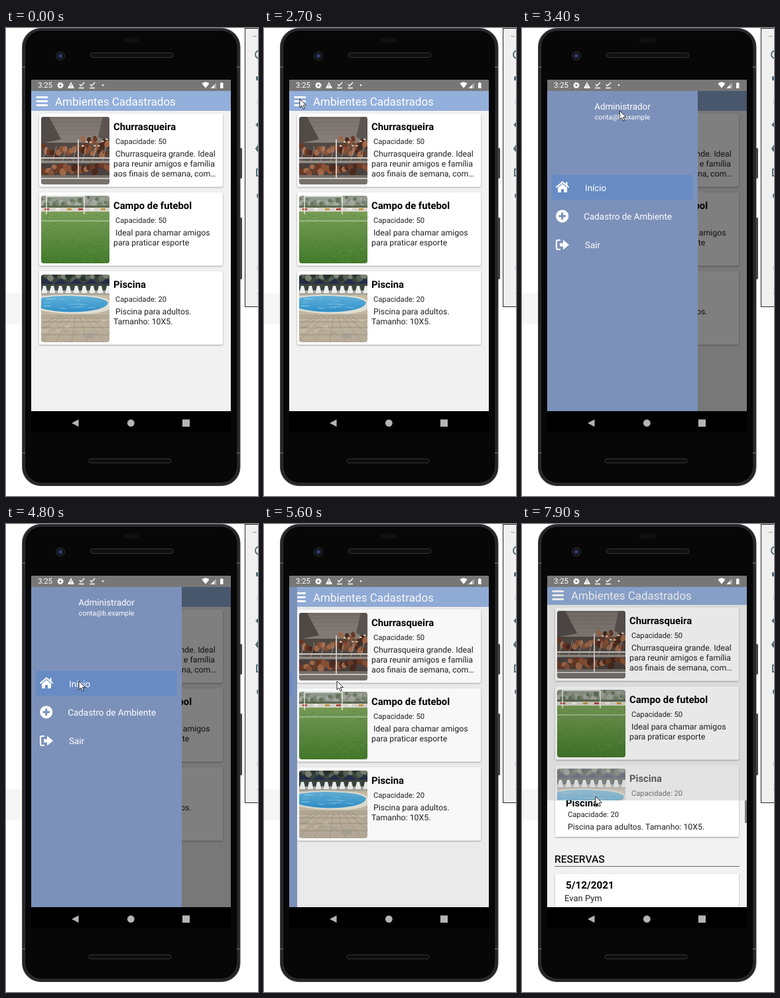
Write an HTML page that moves like this. It is 380x706 px and loops after 8 s.

```html
<!DOCTYPE html>
<html lang="pt-BR">
<head>
<meta charset="utf-8">
<title>Ambientes Cadastrados</title>
<style>
html, body { margin: 0; width: 100%; height: 100%; overflow: hidden; background: #fff; }
svg { display: block; font-family: Roboto, sans-serif; text-rendering: geometricPrecision; }
text { white-space: pre; }
</style>
</head>
<body>
<svg id="stage" width="380" height="706" viewBox="0 0 380 706"></svg>
<script>
const LOOP = 8000, STEP = 100, DRAWER = 227;

let seed = 7;
const rnd = (a = 0, b = 1) => {
  seed = (seed * 16807) % 2147483647;
  return a + (b - a) * seed / 2147483647;
};
const many = (n, fn) => Array.from({ length: n }, (_, i) => fn(i)).join('');
const rect = (x, y, w, h, fill, more = '') =>
  `<rect x="${x}" y="${y}" width="${w}" height="${h}" fill="${fill}" ${more}/>`;
const path = (d, fill, more = '') => `<path d="${d}" fill="${fill}" ${more}/>`;
const line = (d, stroke, width, more = '') =>
  path(d, 'none', `stroke="${stroke}" stroke-width="${width}" ${more}`);
const disc = (x, y, r, fill, more = '') => `<circle cx="${x}" cy="${y}" r="${r}" fill="${fill}" ${more}/>`;
const text = (x, y, size, str, fill = '#222', more = '') =>
  `<text x="${x}" y="${y}" font-size="${size}" fill="${fill}" ${more}>${str}</text>`;
const bold = 'font-weight="700"';

const defs = `<defs>
  <clipPath id="screen">${rect(38, 95, 301, 483, '#000')}</clipPath>
  <clipPath id="reveal"><rect id="edge" x="38" y="578" width="301" height="0"/></clipPath>
  <clipPath id="pic">${rect(0, 0, 103, 102, '#000', 'rx="4"')}</clipPath>
  <filter id="lift" x="-5%" y="-10%" width="110%" height="125%">
    <feDropShadow dx="0" dy="1" stdDeviation="1.2" flood-opacity=".38"/>
  </filter>
  <linearGradient id="wall" x2="0" y2="1"><stop stop-color="#756d68"/><stop offset="1" stop-color="#a39b94"/></linearGradient>
  <linearGradient id="grass" x2="0" y2="1"><stop stop-color="#779d57"/><stop offset="1" stop-color="#437a2b"/></linearGradient>
  <linearGradient id="water" x2="0" y2="1"><stop stop-color="#62b2d9"/><stop offset="1" stop-color="#2f8fca"/></linearGradient>
  <linearGradient id="deck" x2="0" y2="1"><stop stop-color="#c9bda5"/><stop offset="1" stop-color="#b6ab98"/></linearGradient>
</defs>`;

function phone() {
  const edge = '#546e7a';
  return rect(0, 400, 26, 47, '#f7f6f6') +
    rect(360.5, .5, 30, 420, '#f0f0f0', 'stroke="#222"') +
    line('M372 12.5H378', '#999', 1) +
    line('M382 34A6 6 0 0 0 382 46', edge, 2) +
    path('M377 73H380V79H377Z', edge) +
    path('M376 146L380 142V150Z', edge) +
    line('M381 176L377 182L382 188', edge, 2) + disc(380, 183, 3, edge) +
    line('M382 213H378V223H382', edge, 2) +
    disc(382, 253, 4, edge) +
    line('M379 108V114M379 359V366M379 399V402', '#c4cbce', 1) +
    rect(351, 181, 5, 46, '#3d3f41', 'rx="1.5"') + rect(351, 286, 5, 93, '#3d3f41', 'rx="1.5"') +
    rect(24.5, .5, 328.5, 690, '#242527', 'rx="28" stroke="#47494b"') +
    rect(28.5, 3.5, 320.5, 683, '#070708', 'rx="25" stroke="#38393b" stroke-width=".8"') +
    line('M24 59H29M348 59H353M24 641H29M348 641H353', '#55575a', 2) +
    rect(177, 15, 24, 7, '#101011', 'rx="3"') +
    rect(127, 37.5, 125, 7, '#111', 'rx="3.5" stroke="#343434"') +
    rect(125, 650, 124, 6, '#0c0c0c', 'rx="3" stroke="#363636"') +
    disc(82, 42, 6.5, '#121318', 'stroke="#303136"') + disc(82, 42, 3, '#2b3c70') +
    rect(38, 78, 301, 532, '#000') +
    path('M99 596L109.5 590.5V601.5Z', '#b5b5b5') + disc(188.3, 596, 5.4, '#b5b5b5') +
    rect(266, 590.5, 11, 11, '#b5b5b5');
}

function statusBar() {
  const tick = x => line(`M${x - 3} 85L${x - 1} 87.5L${x + 4} 82M${x - 4} 90.5H${x + 4}`, '#fff', 1.4);
  return rect(38, 78, 301, 17, '#777') + text(48, 90.4, 11.4, '3:25', '#fff') +
    disc(82, 86.5, 2.7, 'none', 'stroke="#fff" stroke-width="2.2"') +
    disc(82, 86.5, 4.1, 'none', 'stroke="#fff" stroke-width="1.4" stroke-dasharray="1.7 1.52"') +
    path('M98 81.5L103 91H93Z', '#fff') + line('M98 84.8V87.6M98 88.6V89.7', '#777', 1.1) +
    tick(114) + tick(130) + disc(146, 86.3, 1.2, '#fff') +
    path('M295.5 83.7Q301 79.3 306.5 83.7L301 90.7Z', '#fff') +
    path('M308.5 91L317 82.5V91Z', '#aaa') + path('M308.5 91L314 85.5V91Z', '#fff') +
    path('M323 83H324.2V82H326.3V83H327.5V91H323Z', '#fff');
}

function grill() {
  const meat = (x, y) => `<ellipse cx="${x}" cy="${y}" rx="${rnd(3, 5)}" ry="${rnd(3.5, 6)}" fill="${
    ['#6b3a25', '#8a5136', '#4b2a1f', '#a0694a'][rnd(0, 4) | 0]}" transform="rotate(${rnd(-35, 35)} ${x} ${y})"/>`;
  return rect(0, 0, 103, 102, 'url(#wall)') +
    many(5, i => line(`M0 ${5 + i * 6}H103`, '#8d857e', .7)) +
    path('M0 0H12L30 34L0 40Z', '#514b48') + path('M93 0H103V40L86 30Z', '#5b5451') +
    rect(0, 39, 103, 27, '#514843') + rect(0, 68, 103, 24, '#49413d') +
    many(22, i => meat(3 + i * 4.7, rnd(44, 58))) +
    many(24, i => meat(2 + i * 4.4, rnd(73, 85))) +
    many(9, i => meat(63 + i * 4.6, rnd(33, 45))) +
    many(7, i => rect(61 + i * 6, rnd(32, 43), 3.5, 2, '#ded5c9')) +
    many(7, i => line(`M${8 + i * 15} 45L${2 + i * 15} 69`, '#aaa29b', .8)) +
    rect(0, 61, 103, 2.5, '#c6c1bc') + rect(0, 68, 103, 2, '#8f8984') +
    rect(0, 88, 103, 14, '#77716c') + rect(0, 92, 103, 2, '#c9c5c0') +
    rect(55, 34, 2, 60, '#cbc6c1');
}

function pitch() {
  return rect(0, 0, 103, 20, '#93998c') +
    many(26, i => disc(i * 4.2, rnd(3, 14), rnd(2, 5), ['#7a8671', '#a4a89d', '#66755c'][i % 3])) +
    rect(0, 15, 103, 4, '#5c6a51') + rect(0, 18, 103, 6, '#d9d5cb') +
    many(6, i => rect(5 + i * 17, 19, 7, 3, ['#b34a3d', '#f2f0e8', '#c49b46'][i % 3])) +
    rect(0, 24, 103, 78, 'url(#grass)') +
    many(110, () => rect(rnd(0, 102), rnd(28, 101), rnd(1, 5), 1, rnd() < .5 ? '#3c7029' : '#7aa358', 'opacity=".45"')) +
    line('M0 38H103', '#cfdac0', 1) +
    line('M8 28V1H65V28', '#eef0ea', 1.4);
}

function pool() {
  return rect(0, 0, 103, 30, '#3b4540') +
    many(16, i => disc(i * 7, rnd(0, 9), rnd(3, 6), ['#28332f', '#566052', '#7b8272'][i % 3])) +
    many(5, i => path(`M${i * 23 - 4} 14L${i * 23 + 7} 6L${i * 23 + 18} 14Z`, '#252d48')) +
    rect(0, 24, 103, 8, '#a9a89e') +
    many(9, i => path(`M${i * 12 + 1} 25L${i * 12 + 3} 17H${i * 12 + 7}L${i * 12 + 9} 25V28H${i * 12 + 1}Z`, '#eceeed')) +
    rect(0, 31, 103, 71, 'url(#deck)') +
    many(6, i => line(`M0 ${62 + i * i * 1.3 + i * 2}H103`, '#928878', .8)) +
    many(9, i => line(`M${28 + i * 6} 61L${i * 24 - 50} 102`, '#988e7e', .7)) +
    many(14, () => rect(rnd(0, 95), rnd(66, 98), rnd(7, 14), 4, rnd() < .5 ? '#d9cbb0' : '#a39c91', 'opacity=".45"')) +
    path('M0 33Q30 28 62 31Q96 32 103 40V52Q90 60 58 59Q25 60 0 54Z', '#e0ded2') +
    path('M0 35Q30 30 62 33Q94 34 101 42Q99 53 60 56Q25 58 0 51Z', 'url(#water)') +
    many(16, () => rect(rnd(0, 80), rnd(36, 52), rnd(5, 12), .8, '#a4d8ed', 'opacity=".7"'));
}

function card(i, name, seats, lines, photo) {
  const y = i * 119;
  return `<g id="card${i}" transform="translate(0 ${y})">` +
    rect(50, 129, 277, 110.5, '#fff', 'rx="3" filter="url(#lift)"') +
    `<g transform="translate(53 134)" clip-path="url(#pic)">${photo}</g>` +
    text(162, 154.4, 14.8, name, '#000', bold) +
    text(165, 175.1, 11.2, 'Capacidade: ' + seats) +
    lines.map((s, k) => text(k ? 162 : 165, 194 + k * 14.75, 12.35, s)).join('') + '</g>';
}

function list() {
  return rect(38, 95, 301, 490, '#f1f1f1') + rect(38, 95, 301, 30, '#93afdb') +
    many(3, i => rect(45.5, 103 + i * 6, 17.5, 3, '#fff', 'rx="1"')) +
    text(74, 117, 17, 'Ambientes Cadastrados', '#fff') +
    card(0, 'Churrasqueira', 50, ['Churrasqueira grande. Ideal', 'para reunir amigos e família', 'aos finais de semana, com…'], grill()) +
    card(1, 'Campo de futebol', 50, ['Ideal para chamar amigos', 'para praticar esporte'], pitch()) +
    card(2, 'Piscina', 20, ['Piscina para adultos.', 'Tamanho: 10X5.'], pool());
}

function drawer() {
  const mid = 'text-anchor="middle"';
  return rect(38, 95, DRAWER, 483, '#7c91ba') +
    text(151.5, 123, 13.4, 'Administrador', '#fff', mid) +
    text(151.5, 138, 10.4, 'conta@b.example', '#fff', mid) +
    rect(45, 221.5, 212.5, 37.5, '#688bc3', 'rx="2"') +
    line('M51.5 240.5L61 232.5L70.5 240.5', '#fff', 2.2) +
    path('M54 241L61 235.2L68 241V248H63V243H59V248H54Z', '#fff') + rect(66, 232.5, 2.5, 5, '#fff') +
    text(95, 245.5, 13.4, 'Início', '#fff') +
    disc(60.7, 283.8, 9.6, '#fff') + line('M55.5 283.8H66M60.7 278.5V289', '#7c91ba', 3) +
    text(93.3, 288.5, 13.4, 'Cadastro de Ambiente', '#fff') +
    line('M58 320H54Q52 320 52 322V332Q52 334 54 334H58', '#fff', 2.2) +
    path('M57 324.5H62V319.5L71 327L62 334.5V329.5H57Z', '#fff') +
    text(95, 331.5, 13.4, 'Sair', '#fff');
}

function details() {
  return rect(38, 95, 301, 500, '#f2f2f2') +
    rect(50, 129, 277, 343, '#fff', 'rx="3" filter="url(#lift)"') +
    text(66, 426, 14.8, 'Piscina', '#000', bold) +
    text(69, 442, 11.2, 'Capacidade: 20') +
    text(69, 461, 12.3, 'Piscina para adultos. Tamanho: 10X5.') +
    text(49, 511, 15.6, 'RESERVAS', '#111', 'font-weight="500"') +
    rect(49, 516, 279, 1, '#666') +
    rect(50, 528, 277, 70, '#fff', 'rx="3" filter="url(#lift)"') +
    text(66, 550, 15.3, '5/12/2021', '#000', bold) +
    text(64, 569, 13, 'Evan Pym') +
    rect(336, 416, 3, 35, '#808080');
}

const $ = id => document.getElementById(id);
$('stage').innerHTML = defs + phone() + statusBar() +
  `<g clip-path="url(#screen)"><g id="list">${list()}</g>` +
  rect(38, 95, 301, 483, '#000', 'id="veil"') +
  `<g id="drawer">${drawer()}</g></g>` +
  `<g clip-path="url(#reveal)"><g id="details">${details()}</g></g>` +
  path('M0 0V13L3 10.3L5.2 15.2L7.4 14.2L5.2 9.6H9.4Z', '#fff', 'id="cursor" stroke="#111" stroke-width=".9"');

// Rows of time followed by values
const pointer = [
  [1100, 188, 300], [1500, 160, 215], [1700, 134.5, 187], [1900, 110, 139], [2000, 90, 124],
  [2300, 54, 107], [2700, 54, 107], [2900, 83, 137], [3300, 140, 126], [3700, 170, 122],
  [3800, 171, 122], [4300, 135, 195], [4600, 113, 232], [4800, 110, 237], [6000, 110, 237],
  [6800, 112, 385], [7100, 111, 411]
];
const open = [
  [2700, 0], [2800, .08], [2900, .493], [3000, .78], [3100, .93], [3200, 1],
  [5200, 1], [5300, .85], [5400, .5], [5500, .2], [5600, .053], [5700, 0]
];
// top of the new page, lift of the old one, dimming, offset of the new one
const swap = [[7700, 578, 0, 0, 12], [7800, 535, -1, .03, 8], [7900, 417, -3, .09, 0]];
const press = [[7600, 1], [7700, .8], [7900, .58]];

function at(rows, t) {
  const n = rows.findIndex(r => r[0] > t);
  if (n < 1) return rows[n ? rows.length - 1 : 0].slice(1);
  const a = rows[n - 1], b = rows[n], k = (t - a[0]) / (b[0] - a[0]);
  return a.slice(1).map((v, i) => v + (b[i + 1] - v) * k);
}

const move = (id, x, y) => $(id).setAttribute('transform', `translate(${x} ${y})`);

function draw(t) {
  const [x, y] = at(pointer, t), [p] = at(open, t), [top, lift, dim, drop] = at(swap, t);
  move('cursor', x, y);
  $('cursor').setAttribute('opacity', t < 1100 ? 0 : 1);
  move('drawer', DRAWER * (p - 1), 0);
  move('list', 0, lift);
  move('details', 0, drop);
  $('veil').setAttribute('opacity', p * .5 + dim);
  $('card2').setAttribute('opacity', at(press, t)[0]);
  $('edge').setAttribute('y', top);
  $('edge').setAttribute('height', 578 - top);
}

const start = performance.now();
function tick() {
  const t = Math.max(0, performance.now() - start) % LOOP;
  draw(Math.floor(t / STEP) * STEP);
  requestAnimationFrame(tick);
}
tick();
</script>
</body>
</html>
```
